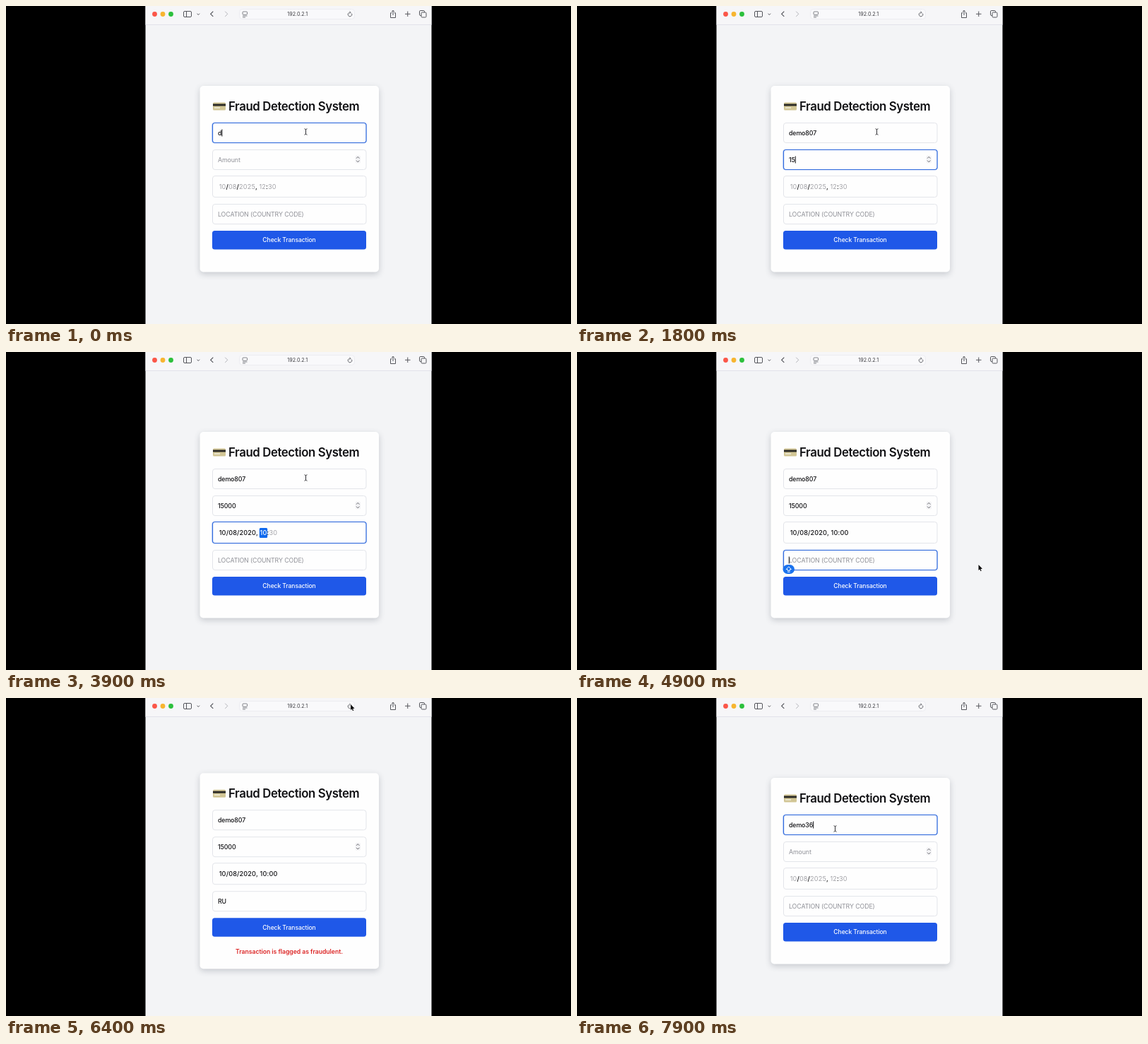
Animation of 800 by 450 pixels, one loop 8000 ms. Source, as an HTML page with a canvas:

```html
<!DOCTYPE html>
<html lang="en">
<head>
<meta charset="utf-8">
<title>Transaction form</title>
<style>
html, body { margin: 0; width: 100%; height: 100%; overflow: hidden; background: #000; }
canvas { display: block; width: 800px; height: 450px; }
</style>
</head>
<body>
<canvas id="stage" width="800" height="450"></canvas>
<script>
const ctx = document.getElementById('stage').getContext('2d');
const LOOP = 8000, STEP = 100;
const FONT = 'Inter, "Open Sans", sans-serif';
const INK = '#111114', PALE = '#a3a3a8', HINT = '#8f9097', ICON = '#55565c';
const PAGE = '#f3f4f6', CARD = '#fefefe', BORDER = '#e3e5ea', FOCUS = '#2f69dc';
const LEFT = 292, WIDTH = 218;
const ROWS = {
  user: { y: 165.5, h: 28 },
  amount: { y: 203.5, h: 28 },
  date: { y: 240.5, h: 30 },
  place: { y: 280.5, h: 28 },
  button: { y: 318, h: 26.5 }
};
const FIELDS = ['user', 'amount', 'date', 'place'];

const RESULT_AT = 5900, RELOAD_AT = 6700, REFOCUS_AT = 7450;
const FOCUS_AT = { user: 0, amount: 1200, date: 2300, place: 4400, button: 5550 };

// Each part of the date: value before, value after, time it is selected
const PARTS = [
  { old: '10', now: '10', at: FOCUS_AT.date, sep: '/' },
  { old: '08', now: '08', at: 2500, sep: '/' },
  { old: '2025', now: '2020', at: 2700, sep: ', ' },
  { old: '12', now: '10', at: 3500, sep: ':' },
  { old: '30', now: '00', at: 3950, sep: '' }
];

// Pointer moves: begin, end, destination
const HOME = { x: 424.5, y: 178 };
const MOVES = [
  { from: 4000, to: 4400, x: 568.5, y: 301 },
  { from: 5000, to: 5500, x: 402.5, y: 333, sag: 28 },
  { from: 5850, to: 6300, x: 488, y: 9 },
  { from: 7150, to: 7450, x: 365.5, y: 185 }
];

const clamp = v => Math.min(1, Math.max(0, v));
const ease = k => k * k * (3 - 2 * k);

function typed(str, t, start, gap) {
  return str.slice(0, Math.max(0, Math.floor((t - start) / gap) + 1));
}

function pointer(t) {
  let { x, y } = HOME;
  for (const m of MOVES) {
    const k = ease(clamp((t - m.from) / (m.to - m.from)));
    x += (m.x - x) * k;
    y += (m.y - y) * k + (m.sag || 0) * Math.sin(Math.PI * k);
  }
  return [x, y];
}

function dateParts(t) {
  return PARTS.map(({ old, now, at, sep }, i) => {
    const end = i + 1 < PARTS.length ? PARTS[i + 1].at : FOCUS_AT.place;
    const keys = typed(now, t, at + 250, 130);
    const done = t >= end;
    const value = done ? now : keys ? keys.padStart(now.length, '0') : old;
    return { value, sep, selected: t >= at && !done, filled: done || keys !== '' };
  });
}

function stateAt(t) {
  if (t >= RELOAD_AT) {
    return {
      user: typed('demo36', t, 7500, 80), amount: '', place: '',
      focus: t >= REFOCUS_AT ? 'user' : '', parts: dateParts(0)
    };
  }
  return {
    user: typed('demo807', t, 0, 130),
    amount: typed('15000', t, 1600, 150),
    place: typed('RU', t, 5000, 100),
    focus: Object.keys(FOCUS_AT).filter(n => FOCUS_AT[n] <= t).pop(),
    parts: dateParts(t),
    badge: t >= 4500 && t < 5200,
    result: t >= RESULT_AT
  };
}

function paint(fill, stroke, lw) {
  if (fill) { ctx.fillStyle = fill; ctx.fill(); }
  if (stroke) { ctx.strokeStyle = stroke; ctx.lineWidth = lw; ctx.stroke(); }
}

function box(x, y, w, h, r, fill, stroke, lw = 1) {
  ctx.beginPath();
  ctx.roundRect(x, y, w, h, r);
  paint(fill, stroke, lw);
}

function path(points, fill, stroke, lw = 1) {
  ctx.beginPath();
  points.forEach(([x, y]) => ctx.lineTo(x, y));
  if (fill) ctx.closePath();
  paint(null, stroke, lw);
  paint(fill);
}

const line = (x1, y1, x2, y2, color = ICON, lw = 1) => path([[x1, y1], [x2, y2]], null, color, lw);

// Open angle with its tip at x, y, pointing along (dx, dy)
function chevron(x, y, dx, dy, size, color = ICON, lw = 1) {
  const bx = x - dx * size, by = y - dy * size;
  path([[bx - dy * size, by - dx * size], [x, y], [bx + dy * size, by + dx * size]], null, color, lw);
}

function arc(x, y, r, a, b, fill, stroke) {
  ctx.beginPath();
  ctx.arc(x, y, r, a, b);
  paint(fill, stroke, 0.9);
}

function text(str, x, y, { size = 8.8, weight = 400, color = INK, align = 'left', spacing = -0.1 } = {}) {
  ctx.font = `${weight} ${size}px ${FONT}`;
  ctx.letterSpacing = spacing + 'px';
  ctx.textAlign = align;
  ctx.fillStyle = color;
  ctx.fillText(str, x, y);
  return ctx.measureText(str).width;
}

function toolbar() {
  box(197.5, 0, 405, 26, 0, '#f6f6f8');
  line(197.5, 26.5, 602.5, 26.5, '#e1e2ea');
  ['#fb5648', '#f7b530', '#2cc03c'].forEach((c, i) => arc(210.5 + i * 11.5, 11.5, 3.4, 0, 7, c));

  box(251.5, 7.5, 11, 8, 1.5, null, ICON);
  line(255.5, 7.5, 255.5, 15.5);
  chevron(272.3, 12.5, 0, 1, 1.8);
  chevron(289.7, 11.3, -1, 0, 3.6, ICON, 1.2);
  chevron(313.8, 11.3, 1, 0, 3.6, '#b4b5ba');

  box(330.5, 4.5, 163, 14, 4, '#f9f9fb', '#ececf1');
  box(335, 8, 6.5, 4.2, 1, null, ICON, 0.7);
  line(335, 14, 341.5, 14, ICON, 0.7);
  line(335, 16, 339, 16, ICON, 0.7);
  text('192.0.2.1', 412.7, 14.3, { size: 7.2, color: '#3a3a3f', align: 'center', spacing: 0 });
  arc(487, 12, 2.8, -0.5, 4.9, null, ICON);
  chevron(488.2, 9.2, 1, 0, 1.6, ICON, 0.8);

  path([[546.3, 9.8], [544.5, 9.8], [544.5, 16.5], [551.5, 16.5], [551.5, 9.8], [549.7, 9.8]], null, ICON);
  line(548, 13, 548, 6.3);
  chevron(548, 6.2, 0, -1, 2);
  line(565, 11.3, 572.5, 11.3);
  line(568.75, 7.5, 568.75, 15);
  box(585.5, 6.5, 7, 7, 1.3, null, ICON);
  box(588, 9, 7, 7, 1.3, '#f6f6f8', ICON);
}

function heading() {
  box(293, 136.5, 18, 11, 1.5, '#d2c695');
  box(293, 138.5, 18, 3, 0, '#2c2b26');
  box(295, 143.3, 8, 1.5, 0, '#f0eddc');
  text('Fraud Detection System', 315, 148, { size: 16.8, weight: 600, spacing: -0.4 });
}

function field(name, focus) {
  const { y, h } = ROWS[name];
  const on = focus === name;
  if (on) box(LEFT, y, WIDTH, h, 3.5, null, 'rgba(80,130,235,0.25)', 2.2);
  box(LEFT + 0.5, y, WIDTH - 0.5, h, 3.5, CARD, on ? FOCUS : BORDER, on ? 1.2 : 1);
}

function entry(name, value, hint, focus) {
  const base = ROWS[name].y + 17.2;
  field(name, focus);
  const w = text(value || hint, 300, base, value ? { weight: 500 } : { color: HINT });
  if (focus === name) box(value ? 300 + w : 299.8, base - 8.2, 1, 10, 0, INK);
}

function dateField(parts, focus) {
  field('date', focus);
  let x = 301.7;
  for (const p of parts) {
    const style = { size: 9.1, weight: p.filled ? 500 : 400, spacing: 0.15 };
    style.color = p.filled ? INK : PALE;
    if (p.selected) {
      style.color = p.filled ? '#fff' : '#9dbbe6';
      ctx.font = `${style.weight} ${style.size}px ${FONT}`;
      ctx.letterSpacing = style.spacing + 'px';
      ctx.textAlign = 'left';
      box(x - 0.8, 249, ctx.measureText(p.value).width + 1.4, 14, 1.5, '#0f69ee');
    }
    x += text(p.value, x, 259, style);
    x += text(p.sep, x, 259, { ...style, weight: 500, color: INK });
  }
}

function spinner() {
  box(494.5, 211.5, 7.5, 11, 2, '#f3f3f5');
  [-1, 1].forEach(d => chevron(498.2, 217.1 + d * 3.7, 0, d, 2.2, '#66676d'));
}

function badge() {
  box(291.5, 301, 16.5, 13, 6.5, '#1a72ee');
  path([[298.2, 309.5], [298.2, 307.5], [296.2, 307.5], [299.8, 303.8], [303.4, 307.5],
    [301.4, 307.5], [301.4, 309.5], [298.2, 309.5]], null, '#fff', 0.9);
  line(298, 311.3, 301.6, 311.3, '#fff', 0.9);
}

function card(s, hover) {
  ctx.save();
  ctx.shadowColor = 'rgba(60,65,85,0.24)';
  ctx.shadowBlur = 8;
  ctx.shadowOffsetY = 3;
  box(274.5, 113, 253.5, s.result ? 277 : 263.5, 5, CARD);
  ctx.restore();

  heading();
  entry('user', s.user, 'User ID', s.focus);
  entry('amount', s.amount, 'Amount', s.focus);
  spinner();
  dateField(s.parts, s.focus);
  entry('place', s.place, 'LOCATION (COUNTRY CODE)', s.focus);

  const { y, h } = ROWS.button;
  box(LEFT, y, WIDTH, h, 3.5, hover ? '#1d48cf' : '#1f58e8');
  text('Check Transaction', 401, 334.4, { size: 8.6, weight: 500, color: '#fff', align: 'center' });
  if (s.badge) badge();
  if (s.result) {
    text('Transaction is flagged as fraudulent.', 401, 368.3,
      { size: 8.7, weight: 600, color: '#dc2626', align: 'center', spacing: -0.05 });
  }
}

function over(name, x, y) {
  const { y: top, h } = ROWS[name];
  return x >= LEFT && x <= LEFT + WIDTH && y >= top && y <= top + h;
}

function cursor(kind, x, y) {
  ctx.save();
  ctx.translate(x, y);
  ctx.lineJoin = 'round';
  if (kind === 'text') {
    line(0, -3.5, 0, 3.5, '#303034');
    [-1, 1].forEach(d => path([[-2, d * 4.3], [0, d * 3.4], [2, d * 4.3]], null, '#303034', 0.9));
  } else if (kind === 'hand') {
    path([[-2, -4], [-0.8, -4], [-0.6, -1], [2.6, -0.4], [3.2, 0.6], [2.6, 4], [-1, 4], [-3.2, 0.8], [-2, 0.2]],
      '#fff', '#1c1c20', 1.1);
  } else {
    path([[0, 0], [0, 8], [1.8, 6.4], [3, 9.2], [4.2, 8.7], [3.1, 6], [5.5, 5.8]], '#0c0c0e', '#fff', 1.2);
  }
  ctx.restore();
}

function draw(t) {
  const s = stateAt(t);
  const shift = s.result ? -6.8 : 0;
  const [x, y] = pointer(t);
  const hover = over('button', x, y - shift);
  const inField = FIELDS.some(n => over(n, x, y - shift));

  box(0, 0, 800, 450, 0, '#000');
  box(197.5, 0, 405, 450, 0, PAGE);
  toolbar();
  ctx.save();
  ctx.translate(0, shift);
  card(s, hover);
  ctx.restore();
  cursor(hover ? 'hand' : inField ? 'text' : 'arrow', x, y);
}

const start = performance.now();
function tick() {
  const t = (performance.now() - start) % LOOP;
  draw(Math.floor(t / STEP) * STEP);
  requestAnimationFrame(tick);
}
tick();
</script>
</body>
</html>
```
